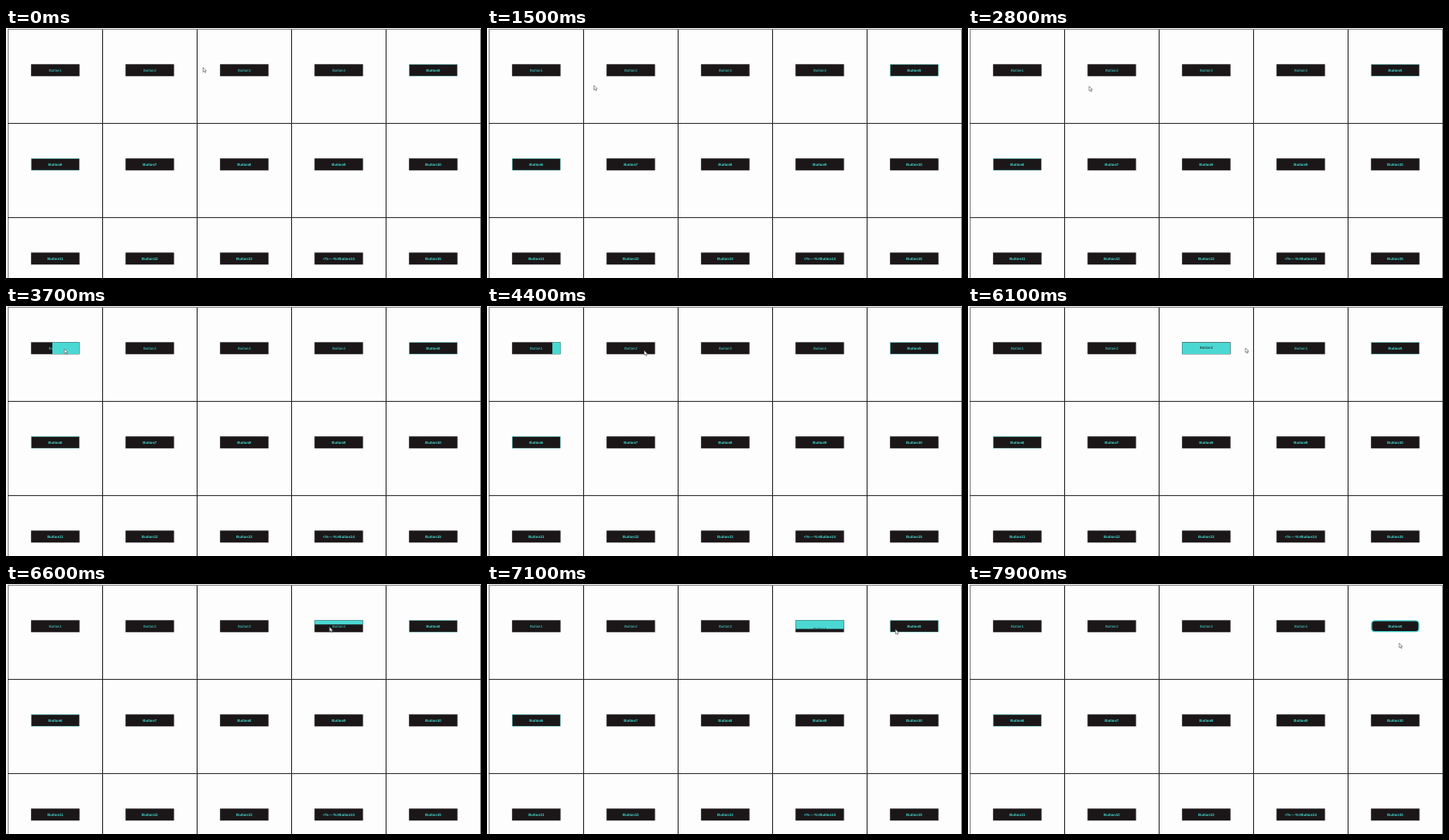
Animation, 553 px wide and 292 px high, one loop 8000 ms. Source, as an HTML page:

```html
<!DOCTYPE html>
<html lang="en">
<head>
<meta charset="utf-8">
<title>Button hover effects</title>
<style>
  html, body { margin: 0; width: 100%; height: 100%; overflow: hidden; background: #fdfdfd; }
  svg { display: block; }
  text {
    font: bold 4.3px "Liberation Sans", Arial, sans-serif;
    text-anchor: middle;
    text-rendering: geometricPrecision;
  }
  .light { font-weight: normal; }
</style>
</head>
<body>
<svg id="stage" width="553" height="292" viewBox="0 0 553 292"></svg>
<script>
const LOOP = 8000, STEP = 100, FADE = 400;
const CELL = 110, W = 56.4, H = 14, BASELINE = 8.5;
const DARK = '#1b1719', CYAN = '#4bd8d3', LABEL = '#45d8cf';
const stage = document.getElementById('stage');

function add(parent, tag, attrs, text) {
  const node = document.createElementNS('http://www.w3.org/2000/svg', tag);
  set(node, attrs);
  if (text) node.textContent = text;
  parent.appendChild(node);
  return node;
}

function set(node, attrs) {
  for (const key in attrs) node.setAttribute(key, attrs[key]);
}

// Grid
const lineColor = isEdge => isEdge ? '#808080' : '#262626';
for (let i = 0; i < 6; i++) {
  add(stage, 'rect', { x: 2 + i * CELL, y: 1, width: 1, height: 291, fill: lineColor(i % 5 === 0) });
}
for (let i = 0; i < 3; i++) {
  add(stage, 'rect', { x: 2, y: 0.9 + i * CELL, width: 551, height: 1, fill: lineColor(i === 0) });
}

// Pointer route: time, x, y
const route = [
  [0, 229.5, 46], [400, 215, 60], [1500, 124.5, 67], [2300, 132, 39],
  [2800, 141, 68], [3800, 60, 48], [4105, 84, 50], [4350, 165, 62],
  [4400, 183, 52], [5060, 194, 49], [5300, 255, 49], [6075, 303, 49],
  [6100, 323, 49], [6957, 415, 51], [7100, 475.5, 53], [7750, 502, 55],
  [7900, 502, 69]
];

function pointerAt(t) {
  const i = route.findIndex(key => key[0] > t);
  if (i < 0) return route[route.length - 1].slice(1);
  const [t0, x0, y0] = route[i - 1], [t1, x1, y1] = route[i];
  const p = (t - t0) / (t1 - t0);
  return [x0 + (x1 - x0) * p, y0 + (y1 - y0) * p];
}

// The span of time the pointer spends over a button.
function hoverSpan({ x, y }) {
  const times = [];
  for (let t = 0; t < LOOP; t += 2) {
    const [px, py] = pointerAt(t);
    if (px > x && px < x + W && py > y && py < y + H) times.push(t);
  }
  return { enter: times[0], leave: times[times.length - 1] };
}

// Buttons
const buttons = Array.from({ length: 15 }, (_, i) => {
  const x = 29.2 + (i % 5) * CELL, y = 42.3 + Math.floor(i / 5) * CELL;
  const name = (i === 13 ? '<%----%>' : '') + 'Button' + (i + 1);
  const box = add(stage, 'rect', { x, y, width: W, height: H, fill: DARK });
  if (i === 4 || i === 5) outline(box, x, y, 0);
  add(stage, 'text', {
    x: x + W / 2, y: y + BASELINE, fill: LABEL, class: i < 4 ? 'light' : ''
  }, name);
  return { x, y, name, box };
});

function outline(box, x, y, amount) {
  const line = 0.4 + 1.2 * amount;
  set(box, {
    x: x + line / 2, y: y + line / 2, width: W - line, height: H - line,
    rx: 5 * amount, stroke: CYAN, 'stroke-width': line
  });
}

// Covers open from the right, left, bottom and top.
const covers = [[1, 0], [-1, 0], [0, 1], [0, -1]].map(([dx, dy], i) => {
  const view = add(stage, 'svg', { overflow: 'hidden' });
  add(view, 'rect', { width: W, height: H, fill: CYAN });
  const label = add(view, 'text', { fill: DARK, class: 'light' }, buttons[i].name);
  return { dx, dy, view, label, button: buttons[i], span: hoverSpan(buttons[i]) };
});
const fifth = buttons[4], fifthSpan = hoverSpan(fifth);

const pointer = add(stage, 'path', {
  d: 'M0 0V5.4L1.3 4.3L2.2 6.3L3.1 5.9L2.2 4H3.9Z',
  fill: '#fff', stroke: '#555', 'stroke-width': 0.6, 'stroke-linejoin': 'round'
});

const ease = p => (1 - Math.cos(Math.PI * Math.min(1, Math.max(0, p)))) / 2;
const hoverAmount = (t, { enter, leave }) => ease((t - enter) / FADE) - ease((t - leave) / FADE);

function draw(t) {
  for (const { dx, dy, view, label, button, span } of covers) {
    const amount = hoverAmount(t, span), gone = 1 - amount;
    const left = dx > 0 ? W * gone : 0, top = dy > 0 ? H * gone : 0;
    set(view, {
      x: button.x + left, y: button.y + top,
      width: dx ? W * amount : W, height: dy ? H * amount : H,
      visibility: amount > 0.01 ? 'visible' : 'hidden'
    });
    // The dark label drifts away from the anchored side.
    set(label, {
      x: W / 2 - left - dx * gone * W,
      y: BASELINE - 0.8 - top - dy * gone * H
    });
  }
  outline(fifth.box, fifth.x, fifth.y, hoverAmount(t, fifthSpan));
  set(pointer, { transform: `translate(${pointerAt(t)})` });
}

const start = performance.now();
function tick() {
  const t = (performance.now() - start) % LOOP;
  draw(Math.floor(t / STEP) * STEP);
  requestAnimationFrame(tick);
}
tick();
</script>
</body>
</html>
```
